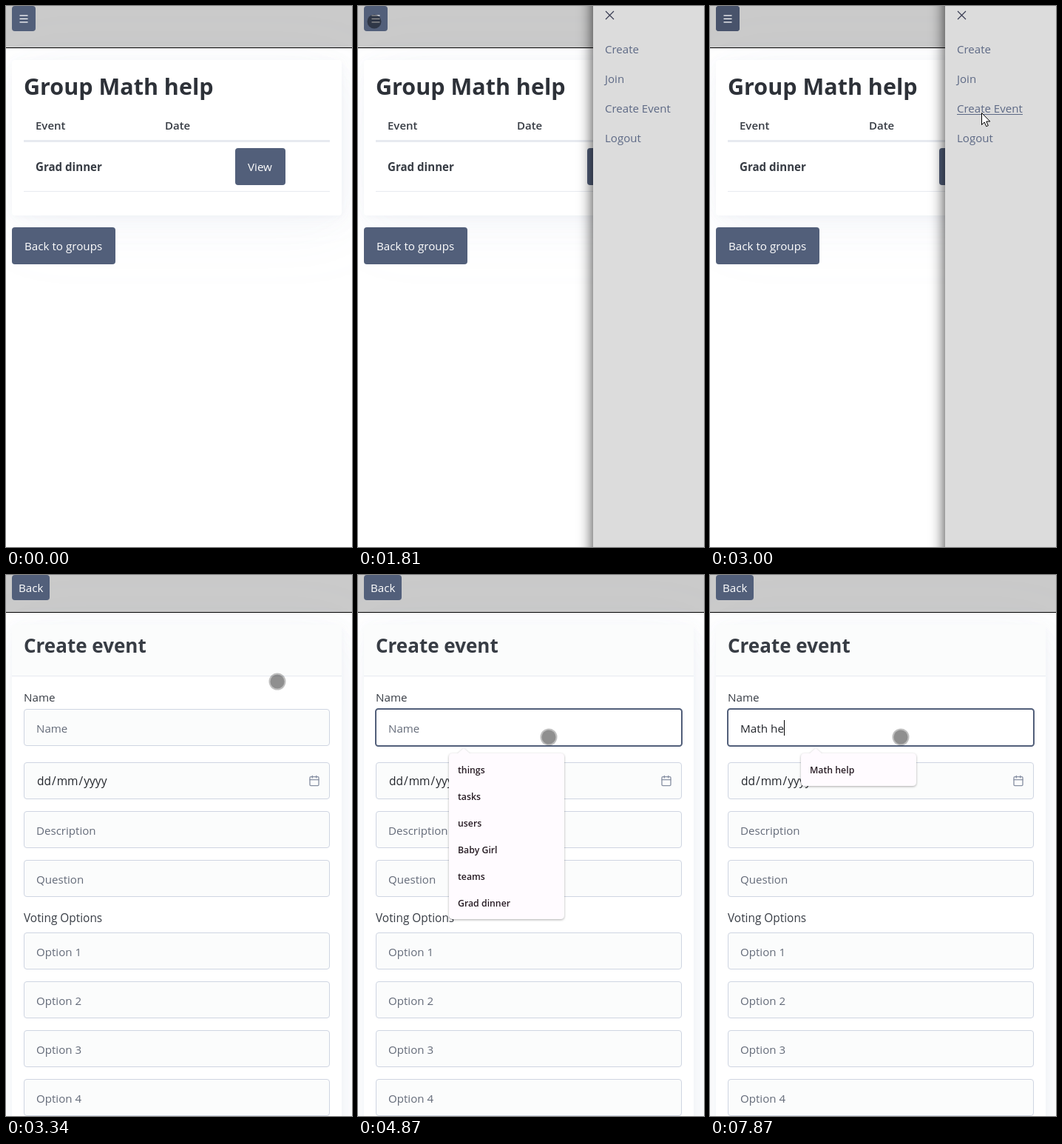
Write an HTML page that moves like this. It is 468 by 731 pixels and loops after 8 s.

```html
<!DOCTYPE html>
<html lang="en">
<head>
<meta charset="utf-8">
<title>Group events</title>
<style>
  html, body { margin: 0; width: 100%; height: 100%; overflow: hidden; background: #fff; }
  svg { display: block; width: 468px; height: 731px; }
  text { font: 15.2px "Open Sans", "Noto Sans", sans-serif; fill: #373c44; }
  .bar { fill: #cacaca; }
  .btn { fill: #525f7a; }
  .hover { fill: #48536b; }
  .light { fill: #fff; }
  .card {
    fill: #fff;
    filter: drop-shadow(1px 2px 5px rgba(129,145,181,.06))
            drop-shadow(3px 7px 18px rgba(129,145,181,.06))
            drop-shadow(8px 16px 44px rgba(129,145,181,.06));
  }
  .rule { fill: #e7eaf0; }
  .h1 { font-size: 30.5px; font-weight: 700; fill: #2d3138; }
  .h2 { font-size: 26px; font-weight: 700; }
  .th { font-size: 15px; font-weight: 600; }
  .td { font-size: 15.1px; font-weight: 700; }
  .side { fill: #dcdcdc; filter: drop-shadow(0 0 10px rgba(0,0,0,.8)); }
  .link { font-size: 15.05px; fill: #5d6985; }
  .field { fill: #fbfcfc; stroke: #cfd5e2; }
  .focus { fill: #fff; stroke: #525f7a; stroke-width: 2; }
  .hint { font-size: 15.1px; fill: #646b79; }
  .date { font-size: 15.5px; fill: #23262c; }
  .typed { font-size: 15.3px; fill: #23262c; }
  .popup { fill: #fffbff; filter: drop-shadow(0 1px 1.5px rgba(0,0,0,.32)); }
  .item { font-size: 12.3px; font-weight: 600; fill: #271c24; }
  .icon { fill: none; stroke: #8891a4; stroke-width: 2; stroke-linecap: round; stroke-linejoin: round; }
</style>
</head>
<body>
<svg viewBox="0 0 468 731" xmlns="http://www.w3.org/2000/svg">
  <!-- group page -->
  <g data-on="0-3340">
    <rect class="bar" width="468" height="56"/>
    <rect y="56" width="468" height="1"/>
    <rect class="card" x="8" y="73" width="446" height="210" rx="4"/>
    <rect class="btn" x="8" y="0" width="32" height="34" rx="4"/>
    <rect class="hover" x="8" y="0" width="32" height="34" rx="4" data-on="2200-3340"/>
    <path d="M18.5 12.9h11M18.5 17.4h11M18.5 21.9h11" stroke="#fff" stroke-width="1.3"/>
    <text class="h1" x="24" y="120">Group Math help</text>
    <text class="th" x="40" y="167">Event</text>
    <text class="th" x="215" y="167">Date</text>
    <rect class="rule" x="24" y="181" width="414" height="3"/>
    <text class="td" x="40" y="223">Grad dinner</text>
    <rect class="btn" x="310" y="192" width="68" height="50" rx="4"/>
    <text class="light" x="327" y="223">View</text>
    <rect class="rule" x="24" y="250" width="414" height="1"/>
    <rect class="btn" x="8" y="299" width="140" height="50" rx="4"/>
    <text class="light" x="25" y="330">Back to groups</text>

    <g data-on="1810-3340">
      <rect class="side" x="318" y="-40" width="190" height="811"/>
      <path d="M335 7l11 11M346 7l-11 11" stroke="#34384f" stroke-width="1.1"/>
      <text class="link" x="334" y="64">Create</text>
      <text class="link" x="334" y="104">Join</text>
      <text class="link" x="334" y="144">Create Event</text>
      <rect x="334" y="146" width="89" height="1" fill="#5d6985" data-on="2880-3340"/>
      <text class="link" x="334" y="184">Logout</text>
    </g>
  </g>

  <!-- event form -->
  <g data-on="3340-8000">
    <rect class="bar" width="468" height="50"/>
    <rect y="50" width="468" height="1"/>
    <rect class="card" x="8" y="67" width="446" height="800" rx="4"/>
    <path d="M8 136V71a4 4 0 0 1 4-4h438a4 4 0 0 1 4 4v65z" fill="#fbfcfc"/>
    <rect class="rule" x="8" y="136" width="446" height="1"/>
    <rect class="btn" x="8" y="0" width="51" height="34" rx="4"/>
    <text class="light" x="17" y="23">Back</text>
    <text class="h2" x="24" y="105">Create event</text>
    <text x="24" y="171">Name</text>
    <text x="24" y="469" style="font-size:15.4px">Voting Options</text>
    <g id="fields"></g>
    <text class="date" y="284"><tspan x="42">dd</tspan><tspan dx="1">/</tspan><tspan dx="1">mm</tspan><tspan dx="1">/</tspan><tspan dx="1">yyyy</tspan></text>
    <g class="icon" transform="translate(409 270) scale(.667)">
      <rect x="3" y="4" width="18" height="18" rx="2"/>
      <path d="M16 2v4M8 2v4M3 10h18"/>
    </g>
    <rect class="focus" id="focus" x="24" y="181" width="414" height="50" rx="3.5"/>
    <text class="hint" x="41" y="213" data-on="3340-5880">Name</text>
    <text class="typed" id="typed" x="41" y="213"></text>
    <rect id="caret" y="196" width="1" height="21" data-on="4280-4870 5400-7210 7550-8000"/>
    <g id="popups"></g>
  </g>

  <!-- pointer -->
  <g id="pointer">
    <g data-on="70-400 660-3000 3340-5950 6200-8000">
      <circle r="11.5" fill="#000" fill-opacity=".25" data-on="0-1530 2130-8000"/>
      <circle r="9.5" fill="#000" fill-opacity=".25"/>
      <circle r="9.5" fill="#000" fill-opacity=".22" data-on="1530-2130"/>
    </g>
    <path data-on="3000-3340" d="M.5 .5V16.5L4.2 13L6.7 18.7L9.3 17.6L6.8 12H11.8Z" fill="#fff" stroke="#000"/>
    <path data-on="5950-6200" d="M0-8l3.4 3.6H1V-1h3.4v-2.4L8 0L4.4 3.4V1H1v3.4h2.4L0 8l-3.4-3.6H-1V1h-3.4v2.4L-8 0l3.6-3.4V-1H-1v-3.4h-2.4z"
          fill="#000" stroke="#fff" stroke-width="1.4" paint-order="stroke"/>
  </g>
</svg>
<script>
const LOOP = 8000;
const $ = id => document.getElementById(id);

const fields = [
  [181, ''], [253, ''], [319, 'Description'], [385, 'Question'],
  ...[1, 2, 3, 4].map(n => [417 + 66 * n, 'Option ' + n])
];
$('fields').innerHTML = fields.map(([y, hint]) =>
  `<rect class="field" x="24.5" y="${y + .5}" width="413" height="49" rx="3.5"/>
   <text class="hint" x="41" y="${y + 32}">${hint}</text>`).join('');

// Suggestion box with a small notch on top
function popup(on, right, items, square) {
  const bottom = 249 + 36 * items.length, r = square ? 0 : 5;
  const box = `M128 241H135L143 234L151 241H${right - r}q${r} 0 ${r} ${r}V${bottom - r}` +
    `q0 ${r} ${-r} ${r}H128q-5 0-5-5V246q0-5 5-5z`;
  const rows = items.map((s, i) => `<text class="item" x="135" y="${268 + 36 * i}">${s}</text>`);
  return `<g data-on="${on}"><path class="popup" d="${box}"/>${rows.join('')}</g>`;
}
const names = ['Mena Tirasuchatrin', 'Mena', 'Merrin', 'Math help'];
$('popups').innerHTML =
  popup('4280-5950', 279, ['things', 'tasks', 'users', 'Baby Girl', 'teams', 'Grad dinner']) +
  popup('5950-6080', 283, names, true) +
  popup('6080-6330', 291, names) +
  popup('6330-8000', 279, ['Math help']);

const timed = [...document.querySelectorAll('[data-on]')].map(el => ({
  el, spans: el.dataset.on.split(' ').map(s => s.split('-').map(Number))
}));

// Pointer path: time, x, y
const path = [
  [70, 416, 718], [200, 300, 470], [330, 60, 172], [400, 0, 158],
  [660, 6, 149], [740, 105, 140], [860, 75, 91], [1000, 45, 66], [1180, 12, 42],
  [1450, 22, 24], [1530, 22, 21], [2130, 22, 21], [2400, 200, 80], [2680, 367, 144],
  [3600, 367, 144], [4000, 280, 201], [4750, 280, 201], [4870, 258, 219], [LOOP, 258, 219]
];
function pointerAt(t) {
  const i = path.findIndex(p => p[0] > t);
  if (i < 1) return path[0].slice(1);
  const [t0, x0, y0] = path[i - 1], [t1, x1, y1] = path[i];
  const k = (t - t0) / (t1 - t0);
  return [x0 + (x1 - x0) * k, y0 + (y1 - y0) * k];
}

const word = 'Math\u00a0he';
const keys = [5880, 6200, 6400, 6670, 7550, 7680, 7870];

function draw(t) {
  for (const { el, spans } of timed)
    el.style.display = spans.some(([a, b]) => t >= a && t < b) ? '' : 'none';
  $('focus').style.opacity = Math.min(1, Math.max(0, (t - 4340) / 200));
  const typed = $('typed');
  typed.textContent = word.slice(0, keys.filter(k => k <= t).length);
  const width = typed.textContent ? typed.getComputedTextLength() : 0;
  $('caret').setAttribute('x', Math.round(41 + width));
  $('pointer').setAttribute('transform', `translate(${pointerAt(t)})`);
}

const start = performance.now();
function tick() {
  draw((performance.now() - start) % LOOP);
  requestAnimationFrame(tick);
}
tick();
</script>
</body>
</html>
```
